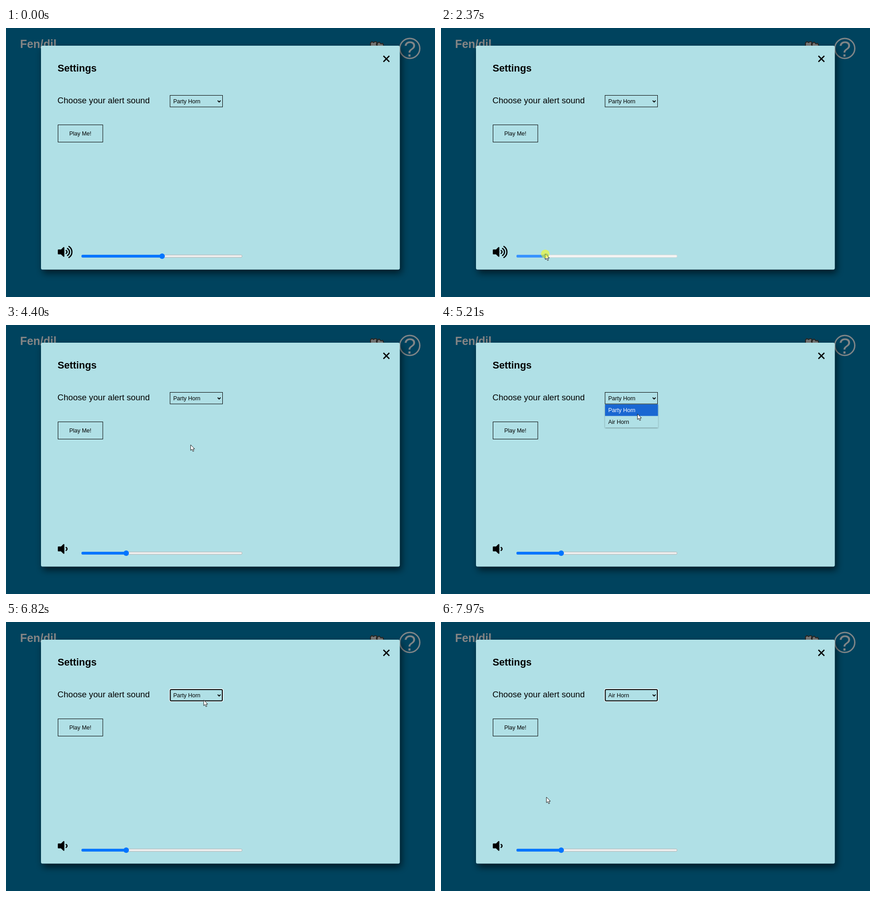
An HTML page for the animation above (8 s loop, 944 by 593 pixels).

```html
<!DOCTYPE html>
<html lang="en">
<head>
<meta charset="utf-8">
<title>Alert settings</title>
<style>
  html, body { margin: 0; width: 100%; height: 100%; overflow: hidden; background: #00435e; }
  svg { display: block; width: 100%; height: 100%; }
  text { font-family: "Liberation Sans", Arial, sans-serif; white-space: pre; }
  .control { font-size: 12.5px; }
  .box { fill: none; stroke: #000; }
</style>
</head>
<body>
<svg viewBox="0 0 944 593">
  <defs>
    <filter id="modalShadow" x="-10%" y="-10%" width="120%" height="125%">
      <feDropShadow dx="4" dy="8" stdDeviation="8" flood-color="#000" flood-opacity=".6"/>
    </filter>
    <filter id="listShadow" x="-10%" y="-20%" width="120%" height="140%">
      <feDropShadow dx="0" dy="1" stdDeviation="1.8" flood-color="#000" flood-opacity=".4"/>
    </filter>
    <clipPath id="trackClip"><rect x="166" y="499.8" width="354" height="6.4" rx="3.2"/></clipPath>
  </defs>

  <rect width="944" height="593" fill="#00435e"/>
  <text x="31" y="44" font-size="24.9" font-weight="700" fill="#858585">Fen/dil</text>
  <g fill="#777" stroke="#292522" stroke-width="2">
    <path d="M802 42V33l3-3 4 2 3-2 4 1-1 5 3 6z"/>
    <path d="M816 42l1-8 4-3 4 4 4-1 2 5-3 3z"/>
  </g>
  <circle cx="888.5" cy="45" r="22" fill="none" stroke="#808587" stroke-width="3"/>
  <text x="888.5" y="62.5" font-size="48" text-anchor="middle" fill="#808587">?</text>

  <rect x="77" y="39" width="789.5" height="493.5" rx="3.5" fill="#b0e0e6" filter="url(#modalShadow)"/>
  <path d="M830.5 61.5l13 13m0-13l-13 13" stroke="#000" stroke-width="2.7"/>
  <text x="113.4" y="95.5" font-size="21.8" font-weight="700">Settings</text>
  <text x="113.2" y="166" font-size="18.65">Choose your alert sound</text>
  <rect class="box" x="114.5" y="213.5" width="98.5" height="38"/>
  <text class="control" x="163.5" y="237" text-anchor="middle">Play Me!</text>

  <rect id="border" class="box" x="361" y="148.5" width="115.5" height="25.5"/>
  <g id="ring" fill="none">
    <rect x="360" y="147.5" width="117.5" height="27.5" rx="3" stroke="#fff" stroke-width="1.6"/>
    <rect x="361.5" y="149" width="114.5" height="24.8" rx="2" stroke="#000" stroke-width="2"/>
  </g>
  <text id="choice" class="control" x="368" y="166"></text>
  <path d="M465.8 160l3.2 3.2 3.2-3.2" fill="none" stroke="#000" stroke-width="1.8"/>

  <g id="list">
    <rect x="361" y="175" width="116.5" height="51" fill="#b0e0e6" filter="url(#listShadow)"/>
    <g id="options">
      <rect id="mark" x="361" width="116.5" height="25.5" fill="#1967d2"/>
      <text class="control" x="368" y="192">Party Horn</text>
      <text class="control" x="368" y="217.5">Air Horn</text>
    </g>
  </g>

  <g transform="translate(114 479.3) scale(.05625)" fill="none" stroke="#000" stroke-width="48" stroke-linecap="round">
    <path d="M24 184H136L232 88V424L136 328H24z" fill="#000" stroke-linejoin="round"/>
    <path d="M326 200A63 63 0 0 1 326 312"/>
    <path id="waves" d="M381 120A161 161 0 0 1 381 392M435 40A258 258 0 0 1 435 472"/>
  </g>

  <rect id="track" x="166.5" y="500.3" width="353" height="5.4" rx="2.7"/>
  <rect id="fill" x="166" y="499.8" height="6.4" clip-path="url(#trackClip)"/>
  <circle id="thumb" cy="503" r="6"/>

  <g id="pointer">
    <path d="M0 0V12.4L2.9 9.8 4.9 14.6 7.1 13.7 5.1 9.1H8.9z" fill="#fff" stroke="#000" stroke-width=".9"/>
    <circle id="press" r="9.4" fill="#ff0" opacity=".53"/>
  </g>
</svg>
<script>
const LOOP = 8000;
const ui = Object.fromEntries([...document.querySelectorAll("[id]")].map(el => [el.id, el]));

const easing = {
  hold: () => 0,
  line: p => p,
  in: p => p * p,
  out: p => 1 - (1 - p) * (1 - p),
  both: p => p * p * (3 - 2 * p)
};

// Time, x, y of the pointer, and how it travels to the next stop.
const stops = [
  [50, 896, 579, "hold"], [80, 637, 462, "hold"], [250, 620, 454, "hold"],
  [480, 620, 454, "in"], [780, 480, 414, "out"], [1110, 341.5, 500.5, "hold"],
  [1570, 341.5, 500.5, "both"], [2370, 229.5, 498, "hold"],
  [3050, 229.5, 498, "both"], [3500, 263, 501, "hold"],
  [3830, 263, 501, "in"], [4400, 406, 265, "out"], [4620, 438, 164, "hold"],
  [5050, 438, 164, "both"], [5300, 430, 209, "hold"],
  [5770, 430, 209, "both"], [6000, 440, 167, "hold"],
  [6120, 440, 167, "both"], [6270, 427, 195, "hold"],
  [6600, 427, 195, "both"], [6810, 435, 172, "hold"],
  [6960, 435, 172, "both"], [7150, 430, 209, "hold"],
  [7340, 430, 209, "both"], [7970, 232, 386, "hold"]
];

const drags = [[1600, 2690], [3050, 3670]];
const hovers = [[1050, 3850]];
const presses = [[1570, 2690], [3050, 3670], [4750, 4850], [5460, 5540],
                 [6030, 6110], [6430, 6500], [6850, 6930], [7240, 7310]];
const openings = [[4800, 5500], [6060, 6460], [6890, 7270]];
const choices = [[0, "Party Horn"], [5500, "Air Horn"], [6460, "Party Horn"], [7270, "Air Horn"]];
const sliderColors = {
  idle: ["#0075ff", "#efefef", "#b2b2b2"],
  hover: ["#005cc8", "#e5e5e5", "#9a9a9a"],
  active: ["#3793ff", "#f5f5f5", "#dddad8"]
};

const during = (ranges, t) => ranges.find(([from, to]) => t >= from && t < to);
const show = (el, on) => el.setAttribute("visibility", on ? "inherit" : "hidden");
const set = (el, attrs) => Object.entries(attrs).forEach(([k, v]) => el.setAttribute(k, v));

function pointerAt(t) {
  const i = Math.max(0, stops.findLastIndex(s => s[0] <= t));
  const [start, x, y, ease] = stops[i];
  const [end, nextX, nextY] = stops[i + 1] || [LOOP, x, y];
  const p = easing[ease](Math.max(0, (t - start) / (end - start)));
  return { x: x + (nextX - x) * p, y: y + (nextY - y) * p };
}

function drawSlider(t) {
  const value = t < 1570 ? 343.5 : pointerAt(Math.min(t, 3500)).x + (t < 1600 ? 2 : 1.5);
  const state = during(drags, t) ? "active" : during(hovers, t) ? "hover" : "idle";
  const [accent, groove, edge] = sliderColors[state];
  set(ui.track, { fill: groove, stroke: edge });
  set(ui.fill, { fill: accent, width: value - 166 });
  set(ui.thumb, { fill: accent, cx: value });
  show(ui.waves, t < 2690);
}

function drawSelect(t, pointer) {
  const opening = during(openings, t);
  const choice = choices.findLast(c => c[0] <= t)[1];
  const focused = t >= 5500 && !opening;
  ui.choice.textContent = choice;
  show(ui.ring, focused);
  show(ui.border, !focused);
  show(ui.list, opening);
  if (!opening) return;
  show(ui.options, t >= opening[0] + 50);
  const row = pointer.y < 175 ? +(choice === "Air Horn") : +(pointer.y >= 200.5);
  ui.mark.setAttribute("y", 175 + row * 25.5);
  ui.options.querySelectorAll("text").forEach((label, i) =>
    label.setAttribute("fill", i === row ? "#fff" : "#000"));
}

function draw(t) {
  const pointer = pointerAt(t);
  drawSlider(t);
  drawSelect(t, pointer);
  show(ui.pointer, t >= 50);
  show(ui.press, during(presses, t));
  ui.pointer.setAttribute("transform", `translate(${pointer.x} ${pointer.y})`);
}

const started = performance.now();
function tick() {
  draw((performance.now() - started) % LOOP);
  requestAnimationFrame(tick);
}
tick();
</script>
</body>
</html>
```
